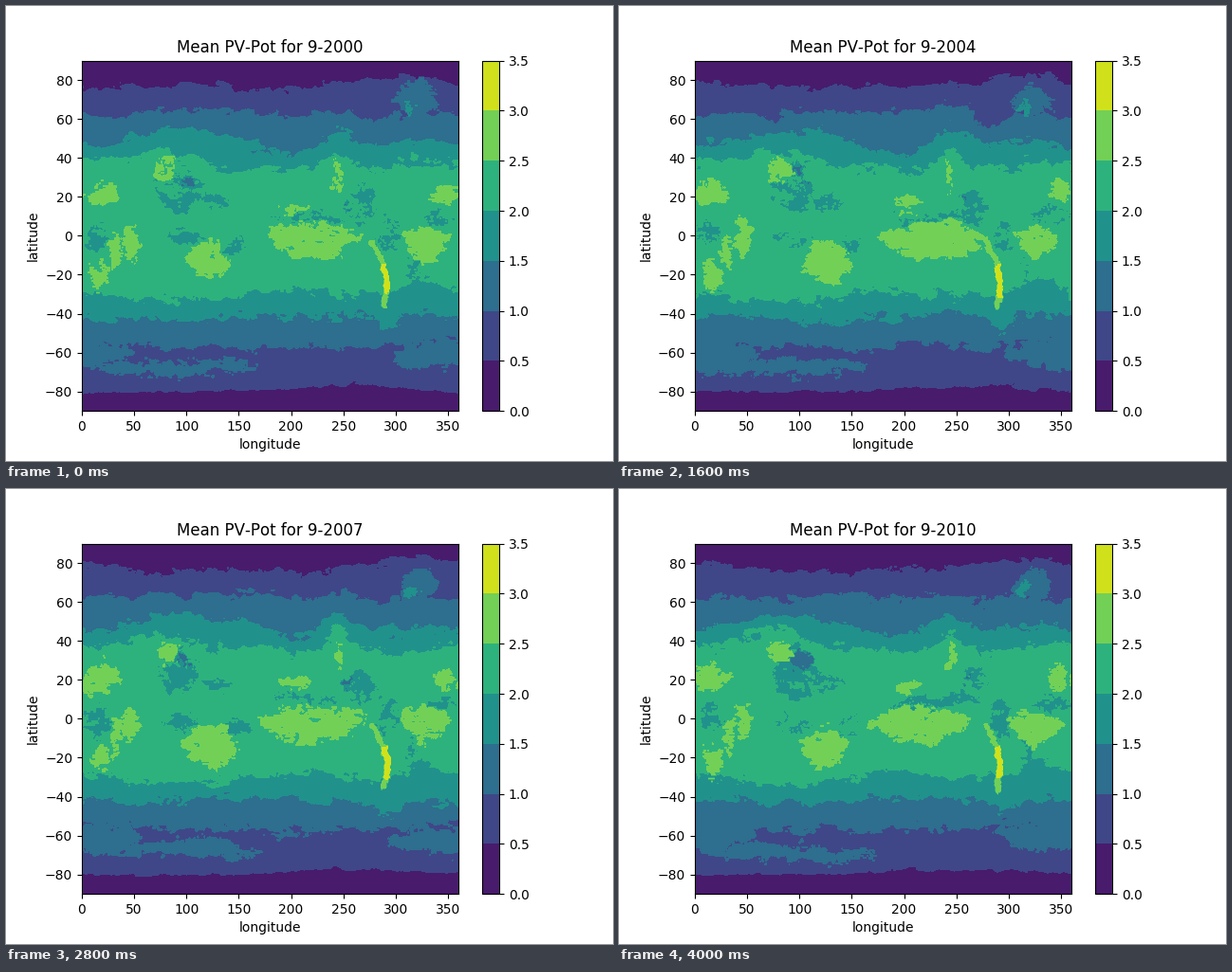
Recreate the animation shown at these times as a matplotlib script. Size 640 by 480 pixels, loop 4400 ms.

```python
import numpy as np
import matplotlib.pyplot as plt
from matplotlib.animation import FuncAnimation

FIRST_YEAR, YEARS = 2000, 11
LEVELS = np.arange(0, 3.6, 0.5)

plt.rcParams["text.kerning_factor"] = 6

lon, lat = np.linspace(0, 359.75, 400), np.linspace(-90, 90, 241)
LON, LAT = np.meshgrid(lon, lat)


def bump(height, center, width):
    gap = (lon - center + 180) % 360 - 180
    return height * np.exp(-(gap / width) ** 2)


# Potential along each latitude line, from south to north
s20 = -30 - bump(3, 90, 60) + bump(4, 195, 35) + bump(8, 330, 25)
n20 = 34 + bump(9, 75, 45) + bump(11, 245, 14) + bump(3, 350, 40)
ZONES = [
    (0.1, lon * 0 - 91),
    (0.5, -80 + bump(3, 250, 75)),
    (1.0, -57 + bump(3, 330, 50)),
    (1.5, -41 - bump(2, 100, 50) - bump(8, 293, 12)),
    (2.0, s20),
    (2.25, s20 + 10),
    (2.25, n20 - 10),
    (2.0, n20),
    (1.5, 46 + bump(8, 95, 45) - bump(4, 195, 25) + bump(9, 245, 18)),
    (1.0, 62 + bump(2, 140, 30) + bump(3, 240, 25) - bump(4, 275, 12)),
    (0.5, 76 + bump(6, 315, 60)),
    (0.1, lon * 0 + 91),
]

# Blobs: longitude, latitude, half width, half height above and below
SUNNY = [
    (18, 21, 17, 6, 6),      # Sahara
    (347, 22, 9, 6, 6),      # West Africa
    (82, 34, 12, 5, 5),      # Tibet
    (17, -20, 8, 7, 8),      # Namibia
    (31, -8, 4, 9, 9),       # East Africa
    (46, -3, 7, 9, 9),       # Horn of Africa
    (123, -12, 21, 9, 12),   # Australia
    (222, 0, 49, 5, 13),     # Pacific
    (203, 17, 14, 3, 3),     # Hawaii
    (244, 31, 3, 7, 7),      # Rockies
    (328, 0, 21, 4, 12),     # Brazil
]
CLOUDY = [
    (14, 1, 12, 8, 8),       # Congo
    (93, 23, 21, 14, 12),    # South-east Asia
    (95, -1, 17, 4, 4),      # Sumatra
    (147, -4, 12, 5, 5),     # New Guinea
    (128, 17, 15, 4, 4),     # Philippines
    (225, 9, 42, 3, 3),      # Pacific rain belt
    (266, 15, 15, 10, 8),    # Central America
    (292, 0, 11, 10, 10),    # Amazon
    (317, -18, 4, 8, 8),     # Bahia
    (342, 9, 19, 3, 3),      # Atlantic rain belt
]
STORMY = [(100, 29, 14, 5, 5), (258, 18, 5, 4, 4)]
SOUTHERN = [(0, -60, 60, 6, 8), (85, -68, 80, 3, 4), (350, -62, 50, 5, 6)]
GREENLAND = [(322, 70, 19, 8, 8)]
FJORDS = [(315, 66, 5, 4, 4)]
ANDES = [(277, -2), (288, -14), (292, -23), (289, -37)]
DESERT = [(289, -15), (292, -22), (291, -30)]


def noise(rng, power):
    """Rough random field with unit spread, wrapping in longitude."""
    k = np.hypot(np.fft.fftfreq(lat.size, 1.5)[:, None] * 0.6,
                 np.fft.fftfreq(lon.size, 0.9)[None, :])
    spectrum = np.fft.fft2(rng.standard_normal(LON.shape))
    field = np.fft.ifft2(spectrum / (k + 1 / 60) ** power).real
    return (field - field.mean()) / field.std()


def zonal_field(y):
    values = [value for value, _ in ZONES]
    edges = np.array([edge for _, edge in ZONES])
    return np.array([np.interp(y[:, i], edges[:, i], values)
                     for i in range(lon.size)]).T


def blobs(shapes, x, y, rng):
    """Mask of rounded diamonds whose place and size vary a little."""
    mask = np.zeros(LON.shape, bool)
    for cx, cy, width, up, down in shapes:
        cx += rng.normal(0, 0.06 * width)
        cy += rng.normal(0, 0.8)
        size = rng.uniform(0.9, 1.15)
        dx = ((x - cx + 180) % 360 - 180) / width
        dy = (y - cy) / np.where(y > cy, up, down)
        mask |= np.abs(dx) ** 1.6 + np.abs(dy) ** 1.6 < size
    return mask


def ridge(points, radius, x, y):
    """Mask of a thin band along a chain of points."""
    ys, xs = [p[1] for p in points][::-1], [p[0] for p in points][::-1]
    return ((np.abs(x - np.interp(y, ys, xs)) < radius)
            & (y > ys[0]) & (y < ys[-1]))


def potential(year):
    rng = np.random.default_rng(year)
    wander, dx, dy, gaps = (noise(rng, p) for p in (1.6, 1.5, 1.5, 1.4))
    calm = np.interp(LAT, [-84, -72, -55, 70, 80], [0.3, 1, 1.9, 1.9, 1.2])
    field = zonal_field(LAT + wander * calm)
    x, y = LON + 2.6 * dx, LAT + 1.6 * dy

    def lower(mask, value):
        field[mask] = np.minimum(field[mask], value)

    def lift(mask, value):
        field[mask] = np.maximum(field[mask], value)

    lower(blobs(CLOUDY, x, y, rng) & (gaps > -0.6), 1.77)
    lower(blobs(STORMY, x, y, rng) & (gaps > 0.1), 1.3)
    lift(blobs(SOUTHERN, x, y, rng), 1.2)
    lift(blobs(GREENLAND, x, y, rng), 1.2)
    lift(blobs(FJORDS, x, y, rng), 1.7)
    lift(blobs(SUNNY, x, y, rng) & (gaps > -1.6), 2.72)
    x, y = LON + 0.7 * dx, LAT + 0.7 * dy
    lift(ridge(ANDES, 2.2, x, y), 2.72)
    lift(ridge(DESERT, 2.4, x, y), 3.25)
    return field


fig, ax = plt.subplots(figsize=(6.4, 4.8), dpi=100)
ax.set_xlabel("longitude")
ax.set_ylabel("latitude")
title = ax.set_title("")
shown = []


def draw(frame):
    year = FIRST_YEAR + frame
    while shown:
        shown.pop().remove()
    shown.append(ax.contourf(lon, lat, potential(year), levels=LEVELS))
    title.set_text(f"Mean PV-Pot for 9-{year}")
    return shown + [title]


draw(0)
fig.colorbar(shown[0], ax=ax)
anim = FuncAnimation(fig, draw, frames=YEARS, interval=400,
                     init_func=lambda: [], repeat=True, repeat_delay=0)
plt.show()
```
